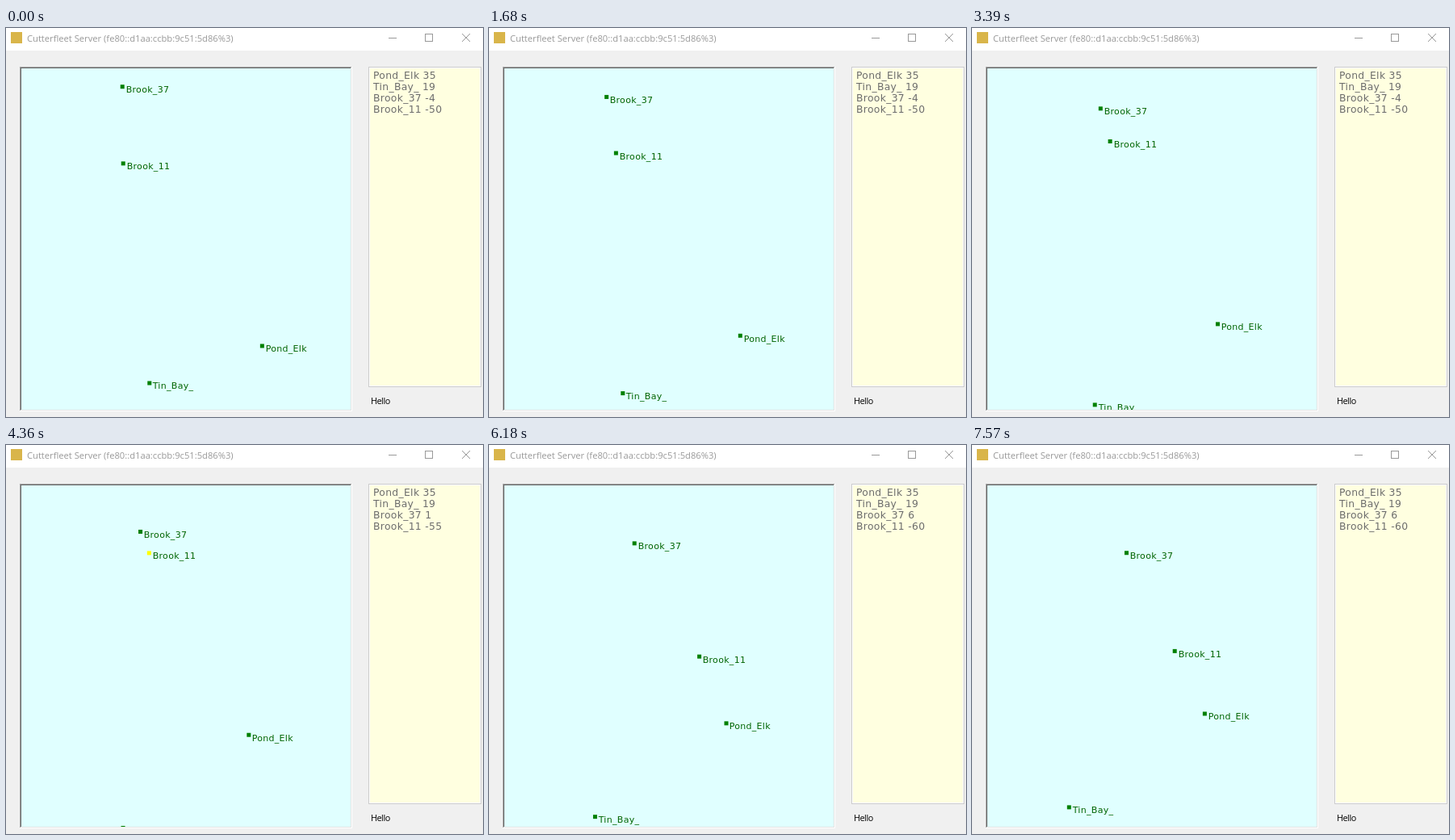
An HTML page for the animation above (7.67 s loop, 591x482 px).

```html
<!DOCTYPE html>
<html lang="en">
<head>
<meta charset="utf-8">
<title>Cutterfleet Server</title>
<style>
html, body { margin: 0; width: 100%; height: 100%; overflow: hidden; background: #f0f0f0; }
svg { display: block; width: 591px; height: 482px; }
text { white-space: pre; }
.title { font: 11.2px "Open Sans", sans-serif; fill: #999; }
.status { font: 10.8px "Open Sans", sans-serif; letter-spacing: -.45px; fill: #000; }
.score { font: 12.3px "DejaVu Sans", sans-serif; letter-spacing: .35px; fill: #6d6d6d; }
.label { font: 11px "DejaVu Sans", sans-serif; letter-spacing: .3px; fill: #006400; }
</style>
</head>
<body>
<svg viewBox="0 0 591 482" xmlns="http://www.w3.org/2000/svg">
  <defs><clipPath id="sea"><rect x="19" y="50" width="408" height="423"/></clipPath></defs>
  <g shape-rendering="crispEdges">
    <rect width="591" height="482" fill="#f0f0f0"/>
    <rect width="591" height="28" fill="#fff"/>
    <rect x="6" y="5" width="14" height="14" fill="#d9b54a"/>
    <!-- sunken panel -->
    <rect x="17" y="48" width="412" height="427" fill="#fff"/>
    <rect x="17" y="48" width="411" height="426" fill="#a0a0a0"/>
    <rect x="18" y="49" width="410" height="425" fill="#e3e3e3"/>
    <rect x="18" y="49" width="409" height="424" fill="#696969"/>
    <rect x="19" y="50" width="408" height="423" fill="#e0ffff"/>
    <!-- score list -->
    <rect x="449.5" y="48.5" width="139" height="396" fill="#fff" stroke="#ccc"/>
    <rect x="451" y="50" width="136" height="393" fill="#ffffe0"/>
    <path d="M474 12.5h10M519.5 7.5h9v9h-9z" fill="none" stroke="#999"/>
  </g>
  <path d="M565 7l10 10M575 7l-10 10" stroke="#999"/>
  <text class="title" x="26" y="17">Cutterfleet Server (fe80::d1aa:ccbb:9c51:5d86%3)</text>
  <text class="status" x="452" y="466">Hello</text>
  <g id="scores"></g>
  <g id="ships" clip-path="url(#sea)"></g>
</svg>
<script>
const LOOP = 7.67, STEP = LOOP / 73;           // seconds
const FIRST_HIT = 3.6, LAST_HIT = 5.63, RESPAWN = 5.84;
const DAMAGE = ["#008000", "#ffff00", "#ffa500", "#ff4500"];

// Share of the attack that is over, 0 to 1.
const attack = t => Math.min(1, Math.max(0, (t - FIRST_HIT) / (LAST_HIT - FIRST_HIT)));
const countHits = t => t < FIRST_HIT ? 0 : Math.floor(1 + 9 * attack(t) ** 0.7);

// The victim slows down in step with its falling health.
function victim(t) {
  if (t >= RESPAWN) return [260 - 6.4 * (t - RESPAWN), 261 - 4.6 * (t - RESPAWN)];
  const u = attack(t);
  const sailed = Math.min(t, FIRST_HIT) + (LAST_HIT - FIRST_HIT) * (u - u * u / 2);
  return [142.4 + 7.7 * sailed, 165.7 - 8.15 * sailed];
}

// Steady courses; Math.abs turns a ship round at a wall.
const ships = [
  { name: "Pond_Elk", score: 35, gain: 0, at: t => [315 - 3.83 * t, 391.8 - 8.06 * t] },
  { name: "Tin_Bay_", score: 19, gain: 0, at: t => [175.6 - 7.6 * t, 472.2 - 8 * Math.abs(t - 4.38)] },
  { name: "Brook_37", score: -4, gain: 1, at: t => [136.4 + 7.65 * Math.abs(t - 0.736), 69.9 + 8.06 * t] },
  { name: "Brook_11", score: -50, gain: -1, at: victim }
];

function set(el, attrs) {
  for (const key in attrs) el.setAttribute(key, attrs[key]);
  return el;
}

function add(parent, tag, attrs) {
  const el = set(document.createElementNS("http://www.w3.org/2000/svg", tag), attrs);
  return document.getElementById(parent).appendChild(el);
}

ships.forEach((ship, i) => {
  ship.row = add("scores", "text", { class: "score", x: 455, y: 63 + 14 * i });
  ship.dot = add("ships", "rect", { width: 5, height: 5 });
  ship.label = add("ships", "text", { class: "label" });
  ship.label.textContent = ship.name;
});

function draw(now) {
  // The window repaints in steps; each shows the middle of its interval.
  const t = (Math.floor(now % LOOP / STEP) + 0.4) * STEP;
  const hits = countHits(t);
  for (const ship of ships) {
    const [x, y] = ship.at(t);
    const damage = ship.at === victim && t < RESPAWN ? Math.floor(hits / 3) : 0;
    set(ship.dot, { x, y, fill: DAMAGE[damage] });
    set(ship.label, { x: Math.round(x) + 6.7, y: Math.round(y) + 10 });
    ship.row.textContent = ship.name + " " + (ship.score + ship.gain * hits);
  }
}

const start = performance.now();
function loop() {
  draw((performance.now() - start) / 1000);
  requestAnimationFrame(loop);
}
loop();
</script>
</body>
</html>
```
